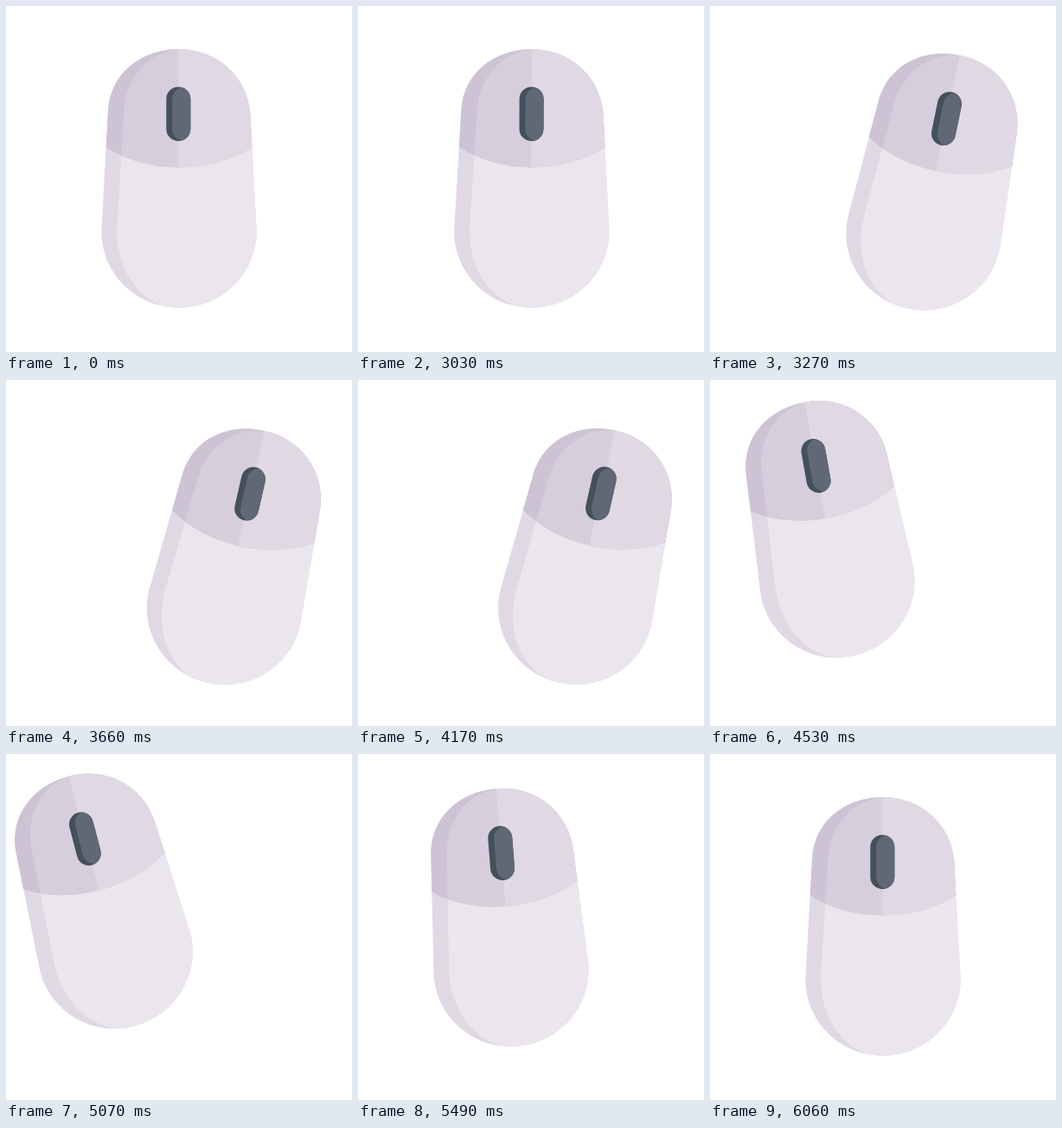
Recreate the animation shown at these times as an HTML page. Size 400x400 px, loop 6090 ms.

```html
<!DOCTYPE html>
<html lang="en">
<head>
<meta charset="utf-8">
<title>Computer mouse</title>
<style>
html, body { margin: 0; width: 100%; height: 100%; overflow: hidden; background: #fff; }
svg { display: block; width: 100%; height: 100%; }
</style>
</head>
<body>
<svg viewBox="0 0 400 400">
  <defs>
    <clipPath id="body">
      <path d="M118 122C120 79 154.5 50 200 50C244 50 279 82 282.2 124L289.7 260C289.7 310 249 348.8 200 348.8S110.3 310 110.3 260Z"/>
    </clipPath>
    <clipPath id="buttons">
      <path d="M100 40H300V163H285C262 178 232 186.5 200 186.5S138 178 115 163H100Z"/>
    </clipPath>
    <path id="lit" d="M200 50C165 53 139 83 136.5 120L128.5 254C126 300 150 338 186 348.5L188 360H300V40H200Z"/>
  </defs>
  <g id="mouse">
    <g clip-path="url(#body)">
      <path fill="#e0d9e4" d="M100 40H300V360H100Z"/>
      <use href="#lit" fill="#ebe6ed"/>
      <g clip-path="url(#buttons)">
        <path fill="#cdc3d5" d="M100 40H300V200H100Z"/>
        <use href="#lit" fill="#d6cfdb"/>
        <path fill="#e0d9e4" d="M199.3 40H300V200H199.3Z"/>
      </g>
    </g>
    <rect x="185.3" y="93.4" width="28" height="62.8" rx="14" fill="#44505b"/>
    <path fill="#606875" d="M203 94A13.9 13.9 0 0 1 213.3 107.4V142.2A13.9 13.9 0 0 1 203 155.7A13.9 13.9 0 0 1 192.2 142.2V107.4A13.9 13.9 0 0 1 203 94Z"/>
  </g>
</svg>
<script>
const LOOP = 6090;
const mouse = document.getElementById('mouse');

// Poses: pivot x, pivot y, angle. The pivot sits at the bottom of the stage.
const rest = [200, 400, 0];
const right = [221.3, 400, 12.9];
const left = [161.4, 364.2, -14.6];

const moves = [
  { start: 3000, length: 500, from: rest, to: right, x2: 0 },
  { start: 4140, length: 720, from: right, to: left, x2: 0.2 },
  { start: 5220, length: 640, from: left, to: rest, x2: 0.2 }
];

// Cubic bezier ease (0.33, 0, x2, 1), solved by bisection.
function ease(t, x2) {
  if (t <= 0) return 0;
  if (t >= 1) return 1;
  let lo = 0, hi = 1, s;
  for (let i = 0; i < 24; i++) {
    s = (lo + hi) / 2;
    const r = 1 - s;
    const x = 0.99 * r * r * s + 3 * r * s * s * x2 + s * s * s;
    if (x < t) lo = s; else hi = s;
  }
  return s * s * (3 - 2 * s);
}

function poseAt(time) {
  const move = moves.findLast(m => time >= m.start);
  if (!move) return rest;
  const p = ease((time - move.start) / move.length, move.x2);
  return move.from.map((v, i) => v + (move.to[i] - v) * p);
}

const began = performance.now();
function draw() {
  const [x, y, angle] = poseAt((performance.now() - began) % LOOP);
  mouse.setAttribute('transform', `translate(${x} ${y}) rotate(${angle}) translate(-200 -400)`);
  requestAnimationFrame(draw);
}
draw();
</script>
</body>
</html>
```
